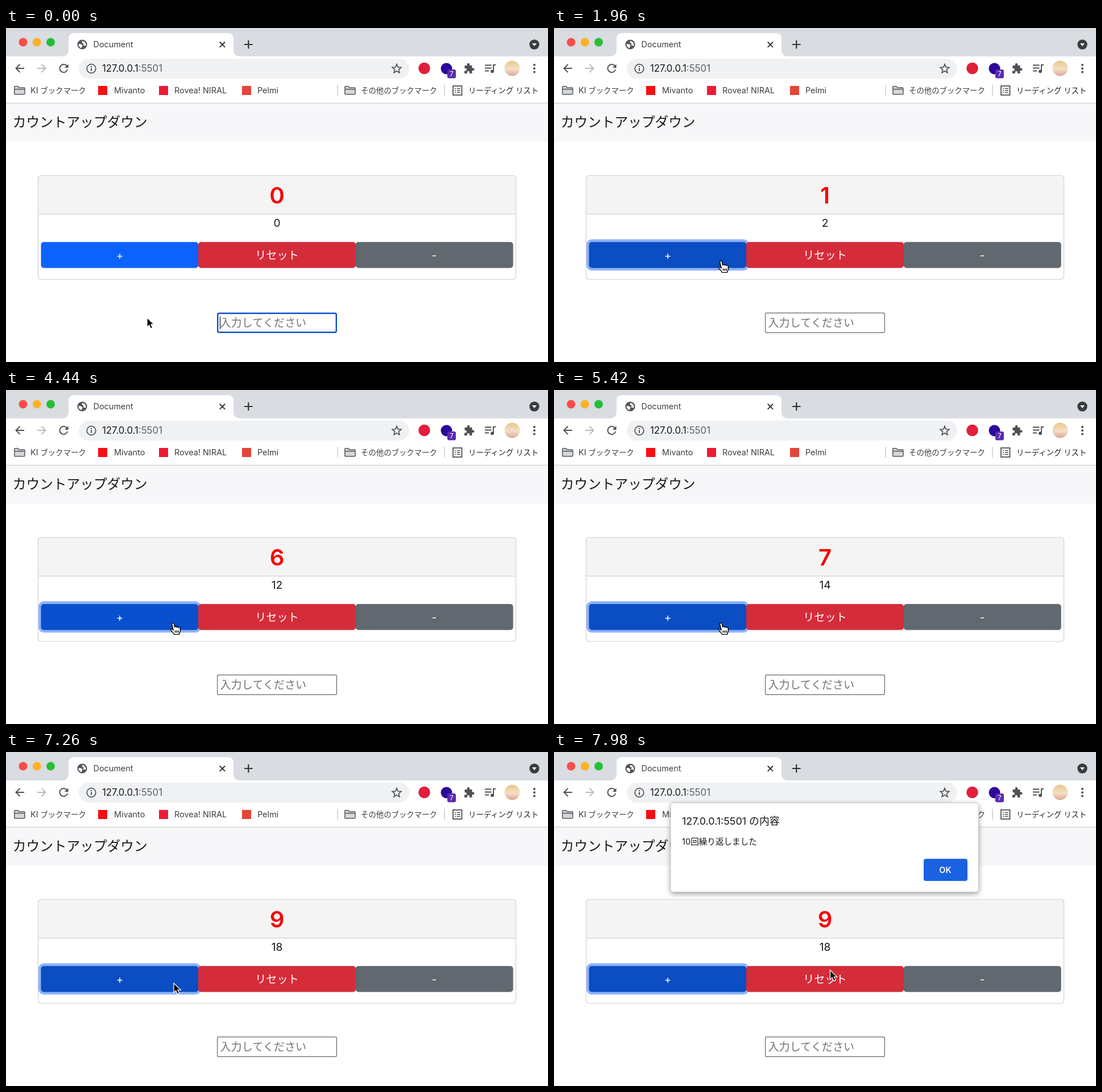
Animation, 953 px wide and 588 px high, one loop 8000 ms. Source, as an HTML page:

```html
<!DOCTYPE html>
<html lang="ja">
<head>
<meta charset="utf-8">
<title>Document</title>
<style>
  html, body { margin: 0; width: 100%; height: 100%; overflow: hidden; background: #fff; }
  svg { display: block; width: 953px; height: 588px; }
  text { font-family: Inter, "Noto Sans CJK JP", "Noto Sans CJK", sans-serif; fill: #17181a; white-space: pre; }
  .ui { font-size: 14.4px; fill: #3b3d41; }
  .jp { font-size: 13.4px; fill: #3b3d41; }
  .mid { text-anchor: middle; }
  .label { font-size: 19.2px; text-anchor: middle; fill: #fff; }
  .line { fill: none; stroke: #4d5054; stroke-width: 1.9; }
  .dark { fill: #4d5054; }
</style>
</head>
<body>
<svg viewBox="0 0 953 588">
  <defs>
    <linearGradient id="skin" x2="0" y2="1">
      <stop offset="0" stop-color="#e8c88b"/>
      <stop offset=".55" stop-color="#f5dfc6"/>
      <stop offset="1" stop-color="#d9a795"/>
    </linearGradient>
    <filter id="shadow" x="-5%" y="-15%" width="110%" height="135%">
      <feDropShadow dx="0" dy="3" stdDeviation="5" flood-opacity=".38"/>
    </filter>
    <g id="folder">
      <path d="M.8 13.4V2.2q0-1.4 1.4-1.4H7l2 2.2h8.6q1.4 0 1.4 1.4v9q0 1.4-1.4 1.4H2.2q-1.4 0-1.4-1.4z" fill="#d4d6d9" stroke="#55585c" stroke-width="1.5"/>
      <path d="M1 5.8h18" stroke="#55585c" stroke-width="1.5"/>
    </g>
  </defs>

  <!-- tab strip -->
  <rect width="953" height="50" fill="#d9dce0"/>
  <circle cx="30" cy="25" r="7.5" fill="#fb4c47"/>
  <circle cx="54.300" cy="25" r="7.5" fill="#fdb126"/>
  <circle cx="78.500" cy="25" r="7.5" fill="#24bf36"/>
  <path d="M98 50q12 0 12-12V19q0-10 10-10h270q10 0 10 10v19q0 12 12 12z" fill="#fff"/>
  <circle cx="134" cy="29" r="8.600" fill="#505357"/>
  <path d="M127.500 28l5 .5 2 2.500-2 4.500q-5-2-5-7.500zM134 22.500l-.5 3 3 2-1 3 4.500 1q2-6.500-6-9z" fill="#fff"/>
  <text class="ui" x="153.500" y="34">Document</text>
  <path class="line" d="M375.700 24.500l9.400 9.400m0-9.400l-9.400 9.400" style="stroke:#303236"/>
  <path class="line" d="M419 29h14.600m-7.300-7.300v14.600" style="stroke:#303236;stroke-width:2.2"/>
  <circle cx="929" cy="29" r="8.700" fill="#3a3c41"/>
  <path d="M925 27h8l-4 5z" fill="#fff"/>

  <!-- toolbar -->
  <g class="line">
    <path d="M32 71H17.500m7-7l-7 7 7 7"/>
    <path d="M55 71h14.500m-7-7l7 7-7 7" stroke="#b8babd"/>
    <path d="M107.500 67.500a7 7 0 1 0 .7 5.500"/>
  </g>
  <path class="dark" d="M109.500 63.500v6.500h-6.500z"/>
  <rect x="128" y="54" width="581" height="35" rx="17.500" fill="#eff1f3"/>
  <circle class="line" cx="150" cy="71.500" r="7.800" style="stroke-width:1.7"/>
  <path class="dark" d="M149.100 70.500h1.900v5.300h-1.900zM149.100 67h1.900v2h-1.900z"/>
  <text x="169" y="77.300" font-size="16.800">127.0.0.1<tspan fill="#5d6065">:5501</tspan></text>
  <path id="star" class="line" style="stroke-width:1.7"/>
  <circle cx="735.500" cy="71" r="10.300" fill="#e21e3c"/>
  <circle cx="774.500" cy="71.500" r="10" fill="#2b079b"/>
  <rect x="776" y="73" width="15" height="15.500" rx="3" fill="#5a2bae"/>
  <text class="mid" x="783.500" y="85.300" font-size="11.500" style="fill:#fff">7</text>
  <path class="dark" d="M806.500 66h4.500q-1-4 2-4t2 4h4.500v4.700q4-1 4 2t-4 2v5.300h-4.600q1-4-2-4t-2 4h-4.900v-4.600q4 .8 4-2t-3.500-2.200z"/>
  <path class="line" d="M842 65.500h11.500M842 70.500h11.500M842 75.500h7M857 76V65h4"/>
  <circle class="dark" cx="855" cy="76.300" r="2.900"/>
  <circle cx="890" cy="71" r="13.500" fill="url(#skin)"/>
  <g class="dark"><circle cx="929" cy="65" r="2"/><circle cx="929" cy="71.200" r="2"/><circle cx="929" cy="77.400" r="2"/></g>

  <!-- bookmarks -->
  <use href="#folder" x="14" y="102"/>
  <text class="jp" x="43" y="114.800"><tspan class="ui">KI</tspan> ブックマーク</text>
  <rect x="162" y="102" width="16" height="16" fill="#f80d12"/>
  <text class="ui" x="190" y="115">Mivanto</text>
  <rect x="269" y="102" width="16" height="16" fill="#ee1a35"/>
  <text class="ui" x="296" y="115">Rovea! NIRAL</text>
  <rect x="415" y="102" width="16" height="16" fill="#e5453a"/>
  <text class="ui" x="442" y="115">Pelmi</text>
  <path d="M583 100v19M771 100v19" stroke="#c3c5c8" stroke-width="1.300"/>
  <use href="#folder" x="595" y="102"/>
  <text class="jp" x="624" y="114.800">その他のブックマーク</text>
  <rect class="line" x="786" y="102" width="15.500" height="16" style="stroke-width:1.8"/>
  <path class="line" d="M789 106.500h2m1.700 0h6M789 110h2m1.700 0h6M789 113.500h2m1.700 0h6" style="stroke-width:1.5"/>
  <text class="jp" x="813" y="114.800" style="fill:#222">リーディング リスト</text>

  <!-- page -->
  <rect y="132" width="953" height="68.500" fill="#f7f7f9"/>
  <rect y="131.700" width="953" height="1.200" fill="#cfd0d3"/>
  <text x="11.800" y="174" font-size="23.700">カウントアップダウン</text>
  <path d="M56.500 327.500V264.500q0-5 5-5h830q5 0 5 5v63z" fill="#f4f4f4"/>
  <rect x="56.500" y="259.500" width="840" height="183" rx="5" fill="none" stroke="#d2d2d2" stroke-width="1.200"/>
  <path d="M57 327.700h839" stroke="#d2d2d2" stroke-width="1.200"/>
  <text id="count" class="mid" x="476.500" y="309.300" font-size="40.200" font-weight="600" style="fill:#f70404"></text>
  <text id="double" class="mid" x="476.500" y="350.300" font-size="19.200"></text>
  <rect id="ring" x="57" y="372" width="285.500" height="55" rx="9" fill="#8fb3fb"/>
  <rect id="plus" x="61.500" y="376.700" width="276.700" height="45.800" rx="5"/>
  <rect x="338" y="376.700" width="277" height="45.800" rx="5" fill="#d52c3a"/>
  <rect x="614.700" y="376.700" width="277" height="45.800" rx="5" fill="#61686f"/>
  <text class="label" x="200" y="406.800">+</text>
  <text class="label" x="476.500" y="406.500">リセット</text>
  <text class="label" x="753" y="407">-</text>
  <rect id="input" fill="#fff"/>
  <text x="376.500" y="525.800" font-size="19.100" style="fill:#707274">入力してください</text>
  <path id="caret" d="M376.500 508v22" stroke="#111" stroke-width="1.200"/>

  <g id="alert">
    <rect x="205" y="89.500" width="541.500" height="157" rx="5" fill="#fff" stroke="#a9a9ab" stroke-width=".6" filter="url(#shadow)"/>
    <text x="225" y="127.600" font-size="17.900">127.0.0.1:5501 の内容</text>
    <text x="225" y="162.800" font-size="14.600">10回繰り返しました</text>
    <rect x="650" y="188" width="77" height="39" rx="4" fill="#1a62e2"/>
    <text class="mid" x="688" y="212.800" font-size="14.600" font-weight="600" style="fill:#fff">OK</text>
  </g>

  <g id="cursor">
    <path id="arrow" d="M0 0V16.500L3.800 13 6.400 19.200 9.600 17.800 7 11.800H12.200Z" fill="#000" stroke="#fff" stroke-width="1.300"/>
    <g id="hand" transform="translate(-1.500 -.3) scale(1.130 .980)" stroke="#000" stroke-width="1.300" stroke-linejoin="round">
      <path d="M0 1.500c0-2.200 3.200-2.200 3.400 0l1.200 6c.3-1.600 2.800-1.400 3 .3 .6-1.400 2.700-1 2.900 .5 .8-1 2.500-.4 2.500 1.200l.3 4c0 3-1.600 4.500-1.800 7h-8c-.3-2.500-3.500-5-5-7.800-1-2 .8-3 2.200-1.600l1.600 1.800z" fill="#fff"/>
      <path d="M5.300 13.500v4M7.800 13.500v4M10.200 13.500v4" fill="none"/>
    </g>
  </g>
</svg>
<script>
const LOOP = 8000, FADE = 150;
const FIRST_PRESS = 980, LAST_PRESS = 6560, HOVER = 620, ALERT = 7260;
const clicks = [1220, 2060, 2620, 3250, 3860, 4440, 5020, 5560, 6160];
const IDLE = [13, 98, 254], OVER = [6, 80, 206], DOWN = [11, 77, 194];

// [time, x, y] of the pointer tip
const path = [[0, 248, 510], [380, 248, 510], [780, 293, 411.5], [980, 293, 411.5], [1060, 293, 410.5],
              [7240, 293, 410.5], [7259, 295, 407], [7320, 295, 407], [7980, 485.5, 384]];

const paints = [[HOVER, OVER]];
clicks.forEach((time, i) => paints.push([i ? time - 260 : FIRST_PRESS, DOWN], [time - 110, OVER]));
paints.push([LAST_PRESS, DOWN]);

const $ = id => document.getElementById(id);
const ease = (t, start, span) => {
  const p = Math.min(1, Math.max(0, (t - start) / span));
  return p * p * (3 - 2 * p);
};
const mix = (a, b, p) => a + (b - a) * p;
const show = (id, on) => $(id).setAttribute('opacity', +on);

function setAttrs(id, attrs) {
  for (const name in attrs) $(id).setAttribute(name, attrs[name]);
}

function buttonColor(t) {
  const color = paints.reduce((c, [time, next]) => c.map((v, i) => mix(v, next[i], ease(t, time, FADE))), IDLE);
  return `rgb(${color.map(Math.round)})`;
}

function pointer(t) {
  const i = path.findIndex(p => p[0] > t);
  if (i < 0) return path[path.length - 1].slice(1);
  const [t0, x0, y0] = path[i - 1], [t1, x1, y1] = path[i];
  const p = ease(t, t0, t1 - t0);
  return [mix(x0, x1, p), mix(y0, y1, p)];
}

function render(t) {
  const count = clicks.filter(time => time <= t).length;
  $('count').textContent = count;
  $('double').textContent = count * 2;
  $('plus').setAttribute('fill', buttonColor(t));
  show('ring', ease(t, FIRST_PRESS, FADE));

  const focused = t < FIRST_PRESS;
  const inset = focused ? 1.2 : 0.6;
  setAttrs('input', {
    x: 371 + inset, y: 501 + inset, width: 211 - 2 * inset, height: 36 - 2 * inset, rx: 2.5,
    stroke: focused ? '#0b50c6' : '#666', 'stroke-width': 2 * inset
  });
  show('caret', t < 380 || (t >= 880 && focused));

  const hand = t >= HOVER && t < ALERT;
  show('hand', hand);
  show('arrow', !hand);
  $('cursor').setAttribute('transform', `translate(${pointer(t)})`);
  show('alert', ease(t, ALERT + 40, 120));
}

const star = Array.from({ length: 10 }, (_, i) => {
  const r = i % 2 ? 3.7 : 8.2, a = i * Math.PI / 5;
  return [687 + r * Math.sin(a), 72 - r * Math.cos(a)];
});
$('star').setAttribute('d', `M${star.join('L')}Z`);

const start = performance.now();
(function tick() {
  render((performance.now() - start) % LOOP);
  requestAnimationFrame(tick);
})();
</script>
</body>
</html>
```
